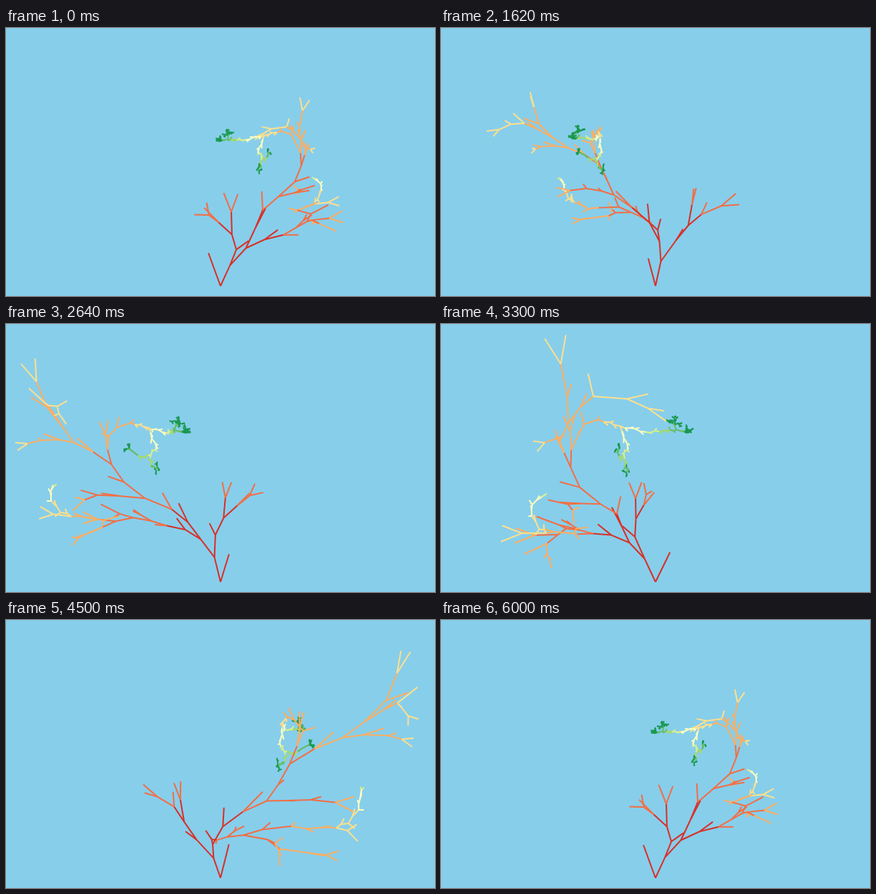
An HTML page with a canvas for the animation above (6.06 s loop, 600 px wide and 374 px high).

```html
<!DOCTYPE html>
<html lang="en">
<head>
<meta charset="utf-8">
<title>Rotating tree</title>
<style>
  html, body { margin: 0; width: 100%; height: 100%; overflow: hidden; background: #87ceeb; }
  canvas { display: block; }
</style>
</head>
<body>
<canvas id="stage" width="600" height="374"></canvas>
<script>
const ctx = document.getElementById('stage').getContext('2d');
const COLORS = ['#d73027', '#f46d43', '#fdae61', '#fee08b', '#ffffbf',
                '#d9ef8b', '#a6d96a', '#66bd63', '#1a9850'];
const LEVELS_PER_COLOR = 4;
const CENTER_X = 300, HORIZON = 172, CAMERA = 617;
const FRAME_MS = 60, FRAMES = 101, START_ANGLE = 57.6, STEP_ANGLE = 3.6;

// Vector helpers
const add = (a, b, s = 1) => a.map((v, i) => v + b[i] * s);
const sub = (a, b) => add(a, b, -1);
const dot = (a, b) => a[0] * b[0] + a[1] * b[1] + a[2] * b[2];
const size = a => Math.hypot(...a);
const unit = a => a.map(v => v / (size(a) || 1));
const cross = (a, b) => [a[1] * b[2] - a[2] * b[1], a[2] * b[0] - a[0] * b[2], a[0] * b[1] - a[1] * b[0]];

let seed = 7;
function random() {
  seed = (seed * 16807) % 2147483647;
  return seed / 2147483647 * 2 - 1;
}
const scatter = amount => [random() * amount, random() * amount, random() * amount];

const nodes = [];
function grow(parent, pos, bare = false) {
  const node = { parent, pos, bare, depth: parent ? parent.depth + 1 : 0, children: [] };
  if (parent) parent.children.push(node);
  nodes.push(node);
  return node;
}

// A chain of joints through the points; steps > 1 makes each span a crooked run of short pieces.
function limb(node, points, steps = 1) {
  for (const end of points) {
    const start = node.pos;
    for (let i = 1; i <= steps; i++) {
      let pos = add(start, sub(end, start), i / steps);
      if (steps > 1 && i < steps) pos = add(pos, scatter(1.4));
      node = grow(node, pos);
    }
  }
  return node;
}

function bush(node, dir, length, levels) {
  node.bare = true;
  if (!levels) return;
  for (let i = 0; i < 2; i++) {
    const next = unit(add(dir, scatter(1.2)));
    bush(grow(node, add(node.pos, next, length), true), next, length * 0.88, levels - 1);
  }
}

// Every joint splits in two: a lone child gets a mirrored twig, an end gets a fork.
function addTwigs() {
  for (const node of nodes.slice()) {
    const { parent, pos, children } = node;
    if (!parent || node.bare || children.length > 1) continue;
    const stem = sub(pos, parent.pos), along = unit(stem);
    if (children.length === 1) {
      const shoot = sub(children[0].pos, pos);
      const mirrored = sub(along.map(v => v * 2 * dot(shoot, along)), shoot);
      grow(node, add(pos, mirrored, 0.85), true);
    } else {
      const before = parent.parent ? sub(parent.pos, parent.parent.pos) : [1, 0, 0];
      const side = unit(cross(before, stem));
      for (const s of [-0.4, 0.4]) {
        grow(node, add(pos, unit(add(along, side, s)), size(stem) * 0.85), true);
      }
    }
  }
}

function buildTree() {
  const root = grow(null, [0, -188, 0]);
  grow(root, [1, -145, -21], true);
  const trunk = limb(root, [[-1, -157, 16]]);

  const left = limb(trunk, [[-16, -130, 35], [-34, -107, 39]]);
  limb(left, [[-39, -77, 41]]);
  limb(left, [[-56, -89, 33], [-84, -76, 37]]);

  const right = limb(trunk, [[10, -133, 35]]);

  const low = limb(right, [[23, -121, 57], [43, -116, 76], [64, -108, 86]]);
  limb(low, [[77, -99, 92]]);
  const lowFork = limb(low, [[89, -102, 93]]);
  const hook = limb(lowFork, [[111, -94, 90], [132, -93, 60], [148, -95, 55],
                              [161, -92, 60], [173, -89, 66], [186, -88, 68]]);
  limb(hook, [[203, -86, 86]]);
  limb(hook, [[199, -82, 69], [210, -67, 71], [211, -56, 70], [210, -48, 60]], 2);
  const lowEnd = limb(lowFork, [[117, -104, 90]]);
  limb(lowEnd, [[136, -102, 110]]);
  limb(lowEnd, [[134, -111, 95], [163, -115, 80], [176, -117, 70]]);

  const high = limb(right, [[29, -107, 40], [57, -86, 37], [94, -69, 45]]);
  limb(high, [[125, -65, 58], [155, -62, 59], [177, -65, 43]]);
  const upper = limb(high, [[117, -47, 62], [133, -23, 66]]);

  const crown = limb(upper, [[160, -6, 61], [188, 6, 52]]);
  limb(crown, [[208, 9, 44], [231, 8, 34], [245, 4, 38]]);
  const peak = limb(crown, [[206, 23, 34]]);
  limb(peak, [[227, 46, 25], [238, 74, 26]]);
  limb(peak, [[222, 37, 14], [233, 45, -3], [232, 42, -34], [236, 33, -54]]);

  const bend = limb(upper, [[140, -3, 62]]);
  limb(bend, [[143, 18, 62]]);
  const arch = limb(limb(bend, [[143, 14, 52], [132, 26, 50], [117, 32, 39]]), [[102, 25, 17]], 4);
  const far = limb(arch, [[93, 18, -12], [98, 19, -34], [103, 20, -51]], 5);
  bush(far, [0.3, 0.1, -0.6], 5.5, 5);
  const curl = limb(arch, [[95, 0, 10], [102, -10, 12]], 4);
  bush(limb(curl, [[116, -13, 12], [131, -3, 9]], 4), [0.3, 0.9, 0], 4, 3);
  bush(limb(curl, [[103, -22, 11], [95, -27, 9]], 4), [-1, -0.1, 0], 4, 3);

  addTwigs();
}

function draw(angle) {
  const c = Math.cos(angle), s = Math.sin(angle);
  for (const node of nodes) {
    const [x, y, z] = node.pos;
    node.near = z * c - x * s;
    const scale = CAMERA / (CAMERA - node.near);
    node.x = CENTER_X + (x * c + z * s) * scale;
    node.y = HORIZON - y * scale;
  }
  const branches = nodes.filter(n => n.parent)
    .sort((a, b) => a.near + a.parent.near - b.near - b.parent.near);

  ctx.fillStyle = '#87ceeb';
  ctx.fillRect(0, 0, 600, 374);
  ctx.lineWidth = 2;
  for (const node of branches) {
    const shade = Math.floor((node.depth - 1) / LEVELS_PER_COLOR);
    ctx.strokeStyle = COLORS[Math.min(shade, COLORS.length - 1)];
    ctx.beginPath();
    ctx.moveTo(node.parent.x, node.parent.y);
    ctx.lineTo(node.x, node.y);
    ctx.stroke();
  }
}

function tick() {
  const frame = Math.floor(performance.now() / FRAME_MS) % FRAMES;
  draw((START_ANGLE + frame * STEP_ANGLE) * Math.PI / 180);
  requestAnimationFrame(tick);
}

buildTree();
tick();
</script>
</body>
</html>
```
